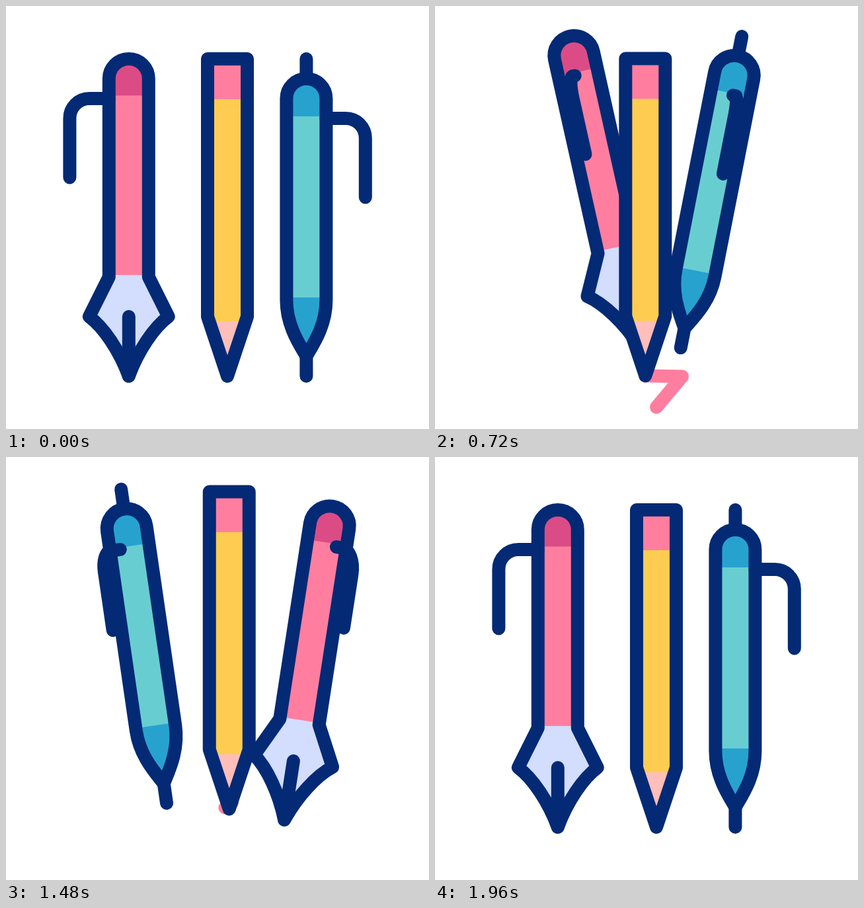
An HTML page with a canvas for the animation above (2 s loop, 640x640 px).

```html
<!DOCTYPE html>
<html lang="en">
<head>
<meta charset="utf-8">
<title>Pens and pencil</title>
<style>
  html, body { margin: 0; width: 100%; height: 100%; overflow: hidden; background: #fff; }
  canvas { display: block; }
</style>
</head>
<body>
<canvas id="stage" width="640" height="640"></canvas>
<script>
const ctx = document.getElementById('stage').getContext('2d');
const LOOP = 2000;
const NAVY = '#042a75', PINK = '#ff7ea0';

// Pen poses: time, cap x, cap y, degrees, clip side (1 = own side, -1 = flipped)
const FOUNTAIN = [
  [400, 185.8, 110, 0, 1], [720, 210, 75, -12.6, .18], [960, 374, 99, -8.75, -.6], [1200, 479.5, 120, 0, -1],
  [1260, 479.5, 120, 0, -1], [1600, 470, 94.5, 13.3, -.1], [1800, 297, 93, 8.5, .55], [1960, 185.8, 110, 0, 1]
];
const BALLPOINT = [
  [400, 454.4, 140, 0, 1], [720, 453, 105, 11.1, .14], [960, 279, 124.6, 6.6, -.56], [1200, 188.2, 140, 0, -1.03],
  [1260, 188.2, 140, 0, -1.03], [1600, 202, 93.4, -12.4, -.06], [1800, 353, 122, -7, .55], [1960, 454.4, 140, 0, 1]
];
// Pencil tip: time, x, y
const TIP = [
  [160, 335, 560], [360, 335, 611], [400, 335, 607], [560, 374, 560.5], [800, 291, 559],
  [990, 342, 523], [1200, 341.5, 495], [1260, 341.5, 495], [1660, 335, 560]
];
const DRAW_START = 400, DRAW_END = 1200, ERASE_END = 1560, TRAIL_LENGTH = 236;

const clamp = v => Math.max(0, Math.min(1, v));
const smooth = u => u * u * (3 - 2 * u);

function segment(keys, t) {
  let i = 0;
  while (i < keys.length - 2 && t >= keys[i + 1][0]) i++;
  return [i, clamp((t - keys[i][0]) / (keys[i + 1][0] - keys[i][0]))];
}

// Smooth curve through the poses, at rest at both ends of each swap
function pose(keys, t) {
  const [i, u] = segment(keys, t), a = keys[i], b = keys[i + 1], span = b[0] - a[0];
  const slope = (k, c) => k % 4 === 0 || k % 4 === 3 ? 0 :
    (keys[k + 1][c] - keys[k - 1][c]) / (keys[k + 1][0] - keys[k - 1][0]);
  return [1, 2, 3, 4].map(c => a[c] + (b[c] - a[c]) * smooth(u) +
    span * (slope(i, c) * u * (1 - u) ** 2 - slope(i + 1, c) * u * u * (1 - u)));
}

function tipAt(t) {
  let [i, u] = segment(TIP, t);
  if (i === 0 || i === TIP.length - 2) u = smooth(u);
  return [1, 2].map(c => TIP[i][c] + (TIP[i + 1][c] - TIP[i][c]) * u);
}

function line(d, color = NAVY) {
  ctx.strokeStyle = color;
  ctx.stroke(new Path2D(d));
}

// Fill an outline with bands of colour, each starting at its y, then stroke it
function body(d, bands) {
  const path = new Path2D(d);
  ctx.save();
  ctx.clip(path);
  for (const [y, color] of bands) {
    ctx.fillStyle = color;
    ctx.fillRect(-80, y, 160, 600);
  }
  ctx.restore();
  ctx.strokeStyle = NAVY;
  ctx.stroke(path);
}

// Clip with a rounded corner from (bendX, 30) to (89.4, bendY)
function clip(side, bendX, bendY) {
  const k = .56, x = v => v * side;
  line(`M${x(30)} 30H${x(bendX)}C${x(bendX + k * (89.4 - bendX))} 30 ` +
    `${x(89.4)} ${bendY - k * (bendY - 30)} ${x(89.4)} ${bendY}V149.5`);
}

function at(x, y, deg, draw) {
  ctx.save();
  ctx.translate(x, y);
  ctx.rotate(deg * Math.PI / 180);
  draw();
  ctx.restore();
}

function fountain(t) {
  const [x, y, deg, side] = pose(FOUNTAIN, t), turned = (1 - side) / 2;
  at(x, y, deg, () => {
    body('M-30 0A30 30 0 0 1 30 0V300L60 360C38 376 14 412 0 450C-14 412 -38 376 -60 360L-30 300Z',
      [[-40, '#db4c86'], [25.5, PINK], [297, '#d3ddfd']]);
    line('M0 360V450');
    clip(-side, 59.5 - 18 * turned, 60 + 11 * turned);
  });
}

function ballpoint(t) {
  const [x, y, deg, side] = pose(BALLPOINT, t);
  at(x, y, deg, () => {
    line('M0 -60V-30M0 390V420');
    body('M-30 0A30 30 0 0 1 30 0V305C30 343 11 371 0 390C-11 371 -30 343 -30 305Z',
      [[-40, '#27a2cf'], [27, '#68cdd1'], [301, '#27a2cf']]);
    clip(side, 59.5, 60);
  });
}

function trail(t) {
  if (t < DRAW_START || t >= ERASE_END) return;
  const points = TIP.filter(k => k[0] >= DRAW_START && k[0] <= Math.min(t, DRAW_END)).map(k => k.slice(1));
  points.push(tipAt(Math.min(t, DRAW_END)));
  const erased = smooth(clamp((t - 1270) / (ERASE_END - 1270)));
  ctx.setLineDash([TRAIL_LENGTH, TRAIL_LENGTH]);
  ctx.lineDashOffset = -erased * TRAIL_LENGTH;
  line('M' + points.join('L'), PINK);
  ctx.setLineDash([]);
}

function pencil(t) {
  const [x, y] = tipAt(t);
  at(x, y, 0, () => body('M-30 -480H30V-90L0 0L-30 -90Z',
    [[-490, PINK], [-419, '#fecc50'], [-83, '#febeba']]));
}

function frame(now) {
  const t = now % LOOP;
  ctx.fillStyle = '#fff';
  ctx.fillRect(0, 0, 640, 640);
  ctx.lineWidth = 20;
  ctx.lineCap = ctx.lineJoin = 'round';
  trail(t);
  fountain(t);
  ballpoint(t);
  pencil(t);
  requestAnimationFrame(frame);
}
frame(0);
</script>
</body>
</html>
```
